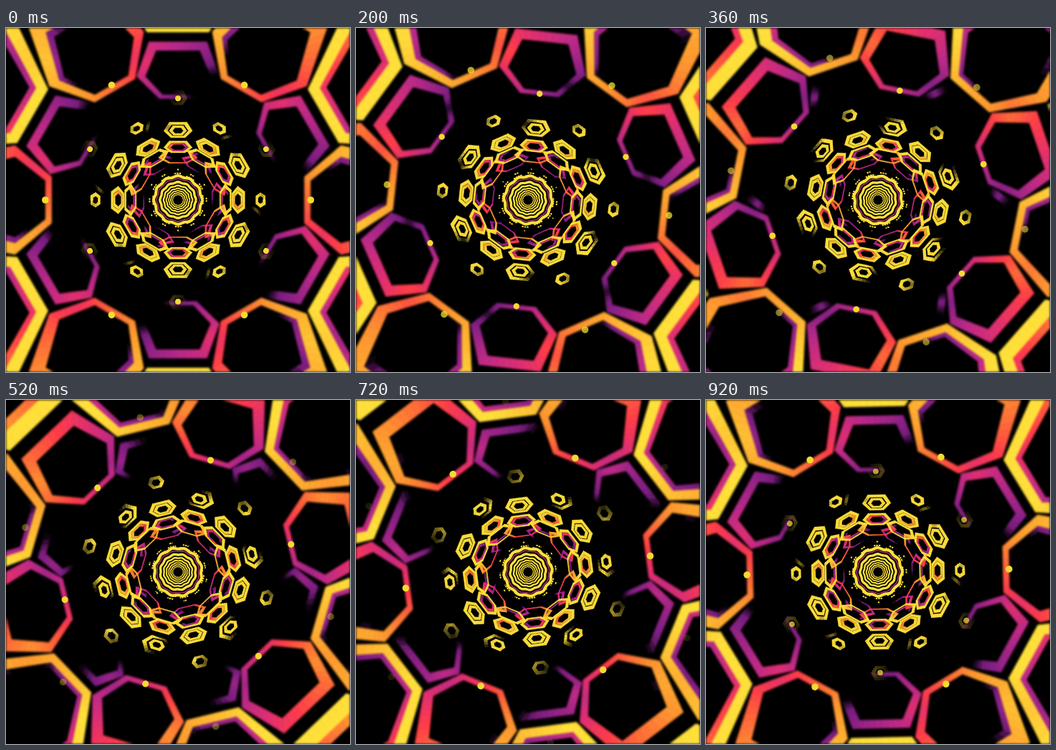
These frames come from a looping animation (480x480 px, 0.96 s). An HTML page with a canvas:

```html
<!DOCTYPE html>
<html lang="en">
<head>
<meta charset="utf-8">
<title>Hexagon tunnel</title>
<style>
  html, body { margin: 0; width: 100%; height: 100%; overflow: hidden; background: #000; }
  canvas { position: absolute; left: 0; top: 0; width: 480px; height: 480px; }
  #near { filter: blur(1.4px); }
  #far { filter: blur(.4px); }
</style>
</head>
<body>
<canvas id="near" width="480" height="480"></canvas>
<canvas id="far" width="480" height="480"></canvas>
<script>
const LOOP = 960, STEP = 40, TAU = Math.PI * 2, YELLOW = '#ffe23c';
const near = document.getElementById('near').getContext('2d');
const far = document.getElementById('far').getContext('2d');

// age of a stroke -> colour
const RAMP = [
  [0, 96, 24, 104], [.2, 134, 32, 134], [.5, 188, 42, 136], [.75, 226, 48, 112],
  [.95, 255, 60, 74], [1.15, 255, 108, 56], [1.35, 255, 150, 48],
  [1.7, 255, 188, 50], [2, 255, 224, 58]
];

// hexagon on the tunnel wall: [sideways, depth]; starts at the trailing outer corner
const HEX = [[-.55, 1], [.55, 1], [1, 0], [.55, -1], [-.55, -1], [-1, 0]];

const clamp = (v, a = 0, b = 1) => Math.min(b, Math.max(a, v));
const fade = (v, a, b) => clamp((b - v) / (b - a));
const depth = s => .0087 - .00165 * s;

function colour(age, alpha) {
  let i = 1;
  while (i < RAMP.length - 1 && age > RAMP[i][0]) i++;
  const a = RAMP[i - 1], b = RAMP[i];
  const k = clamp((age - a[0]) / (b[0] - a[0]));
  const mix = n => Math.round(a[n] + (b[n] - a[n]) * k);
  return `rgba(${mix(1)},${mix(2)},${mix(3)},${alpha.toFixed(3)})`;
}

// point on the hexagon outline, x counted in edges
function outline(x) {
  x = (x + 12) % 6;
  const i = Math.floor(x), k = x - i, a = HEX[i], b = HEX[(i + 1) % 6];
  return [a[0] + (b[0] - a[0]) * k, a[1] + (b[1] - a[1]) * k];
}

// q is the inverse of the distance from the tunnel's axis on screen
function project(q, w, h, p, size) {
  const r = 1 / Math.max(q - p[1] * h * size, .0004);
  return [r, p[0] * w * size * r];
}

// calls paint for the six copies of layer s
function sixfold(g, s, paint) {
  for (let k = 0; k < 6; k++) {
    g.save();
    g.translate(240, 240);
    g.rotate((s / 12 + k / 6) * TAU);
    paint();
    g.restore();
  }
}

// life is the pair of ages between which a stroke fades away
function ring(g, s, q, w, h, age, parts, alpha, life) {
  if (age <= 0 || alpha <= 0) return;
  const e = .055 + .0175 / w, n = parts * 6, quads = [];
  for (let i = 0; i < n; i++) {
    // strokes spread both ways from the middle of the trailing outer edge
    const x = (i + .5) / parts - 3;
    const old = age - Math.abs(x) / 3.2;
    const a = outline(i / parts - 3.5), b = outline((i + 1) / parts - 3.5);
    const shown = alpha * clamp(old / .12) * fade(old, ...life);
    if (shown <= 0) continue;
    quads.push([
      colour(old, shown), shown === 1,
      project(q, w, h, a, 1 + e), project(q, w, h, b, 1 + e),
      project(q, w, h, b, 1 - e), project(q, w, h, a, 1 - e)
    ]);
  }
  g.lineWidth = .5;
  sixfold(g, s, () => {
    for (const [c, solid, ...pts] of quads) {
      g.beginPath();
      pts.forEach(p => g.lineTo(p[0], p[1]));
      g.closePath();
      g.fillStyle = g.strokeStyle = c;
      g.fill();
      if (solid) g.stroke();
    }
  });
}

function dots(g, s, r, size, alpha) {
  if (alpha <= 0) return;
  g.fillStyle = `rgba(242,220,48,${alpha})`;
  sixfold(g, s, () => {
    g.beginPath();
    g.arc(r, 0, size, 0, TAU);
    g.fill();
  });
}

function nearCells(s) {
  const q = .0072 - .0014 * s;
  ring(near, s, q, .262, .001, s - 1.7, 8, 1, [8, 9]);
  ring(near, s, q, .3, .00114, s - .23, 8, 1, [8, 9]);
}

// far cells shrink as they come closer; p is their phase of life
function farCells(s) {
  const q = depth(s), p = s + 7;
  const w1 = Math.min(.42, .15 + .27 * Math.exp((2 - p) * .55));
  const w2 = clamp(.07 + (7 - p) * .033, .07, w1 * .8);
  ring(far, s, q, w2, w2 * .0055, p - 2.8, 4, fade(p, 7.6, 8.2), [3.9, 5.2]);
  ring(far, s, q, w1, w1 * .0055, p - .23, 4, 1, [5.6, 6]);
}

// dashed bars that widen inwards and form the twelve spikes
function spikes(s) {
  const r = 1 / depth(s), half = clamp((-8.5 - s) * .055, .02, .24);
  far.strokeStyle = YELLOW;
  far.globalAlpha = fade(s, -8.9, -8.4);
  far.lineWidth = 1.9;
  far.setLineDash([2.4, 1]);
  sixfold(far, s, () => {
    far.beginPath();
    far.arc(0, 0, r, -half, half);
    far.stroke();
  });
  far.setLineDash([]);
  far.globalAlpha = 1;
}

function circle(r, width, c, wave, turn) {
  far.beginPath();
  for (let i = 0; i <= 96; i++) {
    const a = i / 96 * TAU, d = r + wave * Math.cos(12 * (a - turn));
    far.lineTo(240 + d * Math.cos(a), 240 + d * Math.sin(a));
  }
  far.strokeStyle = c;
  far.lineWidth = width;
  far.stroke();
}

function core(t) {
  const turn = t / 12 * TAU;
  circle(33, 4, YELLOW, .9, turn);
  circle(29.3, 1.6, '#a82c70', .6, turn);
  circle(24.6, 3.4, YELLOW, .6, turn);
  circle(19.8, 2.4, YELLOW, .5, turn);
  circle(16, 2, YELLOW, .4, turn);
  circle(12.8, 1.7, YELLOW, .3, turn);
  circle(10, 1.6, YELLOW, .3, turn);
  circle(7.5, 1.4, '#e0c83a', .3, turn);
}

function draw(t) {
  near.clearRect(0, 0, 480, 480);
  far.clearRect(0, 0, 480, 480);
  core(t);
  for (let j = -13; j <= 3; j++) {
    const s = j + t;
    if (s < -8.4) spikes(s);
    if (s > -6.8 && s < 1.3) farCells(s);
    if (s > .2) nearCells(s);
    if (s > .85) {
      const r = 1 / depth(s);
      dots(far, s, r, clamp(r * .028, 3.8, 4.8), clamp((s - .85) / .15) * fade(s, 2, 2.85));
    }
  }
}

let start = null, last = -1;
function tick(now) {
  if (start === null) start = now;
  const n = Math.floor(((now - start) % LOOP) / STEP);
  if (n !== last) {
    last = n;
    draw(n * STEP / LOOP);
  }
  requestAnimationFrame(tick);
}
draw(0);
requestAnimationFrame(tick);
</script>
</body>
</html>
```
